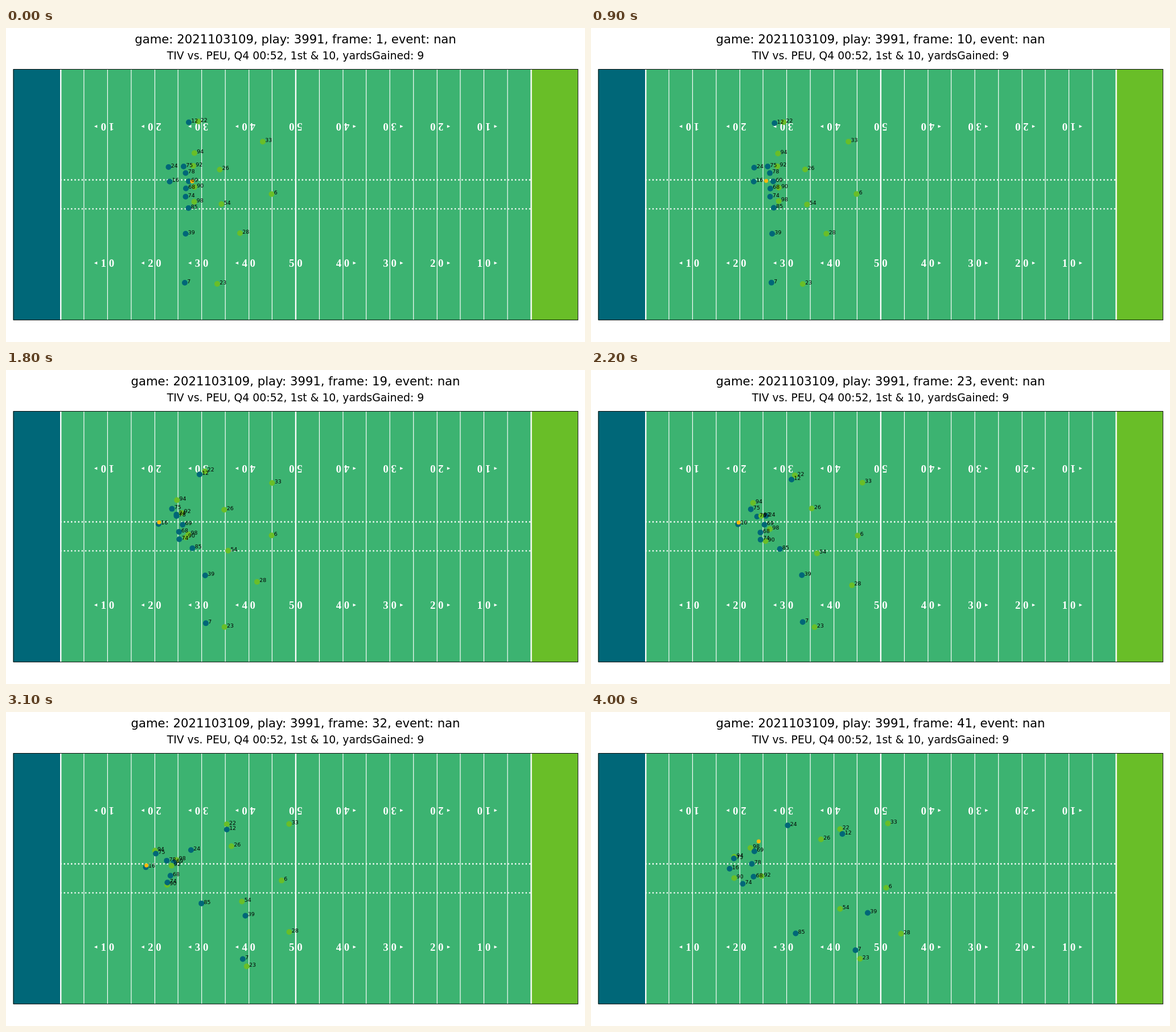
These frames come from a looping animation (1017 px wide and 551 px high, 4100 ms). An HTML page with a canvas:

```html
<!DOCTYPE html>
<html lang="en">
<head>
<meta charset="utf-8">
<title>Play tracking</title>
<style>
  html, body { margin: 0; width: 100%; height: 100%; overflow: hidden; background: #fff; }
  canvas { display: block; }
</style>
</head>
<body>
<canvas id="stage" width="1017" height="551"></canvas>
<script>
const ctx = document.getElementById('stage').getContext('2d');
const STEP = 100, STEPS = 41;
const SNAP = 6, MID = 27, THROW = 35, END = 40;
// the chart is laid out 1200 units wide at 100 dpi, then scaled to the stage
const SCALE = 1017 / 1200, PT = 100 / 72;
const LEFT = 15, YARD = 9.75, TOP = 85.5;
const TEAL = '#006778', LIME = '#69be28', GOLD = '#fbb90c', GRASS = '#3cb371';
const SANS = '"DejaVu Sans", sans-serif';
const SERIF = '"Liberation Serif", "Times New Roman", serif';
const EVENTS = { 7: 'autoevent_ballsnap', 36: 'autoevent_passforward' };

// each player: where they stand at the snap, midway and at the end
const players = [];
const away = (num, ...path) => players.push({ num, color: LIME, path });
const home = (num, ...path) => players.push({ num, color: TEAL, path });

away(94, [331, 219.5], [269, 239], [251.5, 254]);
away(90, [331, 279], [294.5, 305], [251.5, 291.5]);
away(98, [330.5, 305], [306.5, 268], [280, 238.5]);
away(22, [337.5, 164], [371.5, 192.5], [437.5, 205.5]);
away(33, [451, 199.5], [488, 197], [521.5, 195.5]);
away(26, [375.5, 248.5], [392.5, 239.5], [404, 223.5]);
away(6, [466.5, 291.5], [474, 292], [518.5, 308.5]);
away(54, [378.5, 309], [406, 327.5], [437.5, 345.5]);
away(28, [411, 360], [479.5, 383.5], [544.5, 389]);
away(23, [371, 449], [406.5, 450], [472.5, 433]);
home(12, [321, 165.5], [369.5, 201.5], [441.5, 214]);
home(24, [285.5, 244], [317, 253.5], [345.5, 199]);
home(75, [312, 243], [269.5, 246], [251, 257]);
home(78, [315.5, 254.5], [284.5, 259], [282.5, 266.5]);
const center = home(69, [321, 269], [298.5, 269.5], [287, 244.5]) - 1;
const passer = home(16, [287.5, 269.5], [249, 271.5], [243.5, 275]) - 1;
home(68, [316, 281.5], [291.5, 286.5], [285.5, 289]);
home(74, [315.5, 296], [290, 298.5], [266.5, 301.5]);
home(85, [320.5, 316], [337.5, 321], [359.5, 388.5]);
home(39, [315.5, 361], [396.5, 359], [486, 352.5]);
home(7, [314, 447], [396.5, 438.5], [464.5, 418]);
away(92, [329, 242], [291, 263], [299.5, 288]);

const mix = (a, b, u) => a + (b - a) * u;
const clamp = u => Math.min(1, Math.max(0, u));

function hermite(a, b, slopeA, slopeB, span, u) {
  const v = 1 - u;
  return a * v * v * (1 + 2 * u) + b * u * u * (3 - 2 * u)
    + span * u * v * (slopeA * v - slopeB * u);
}

// at rest until the snap, then a smooth curve through the key points
function along([a, b, c], s) {
  const cruise = (c - a) / (END - SNAP);
  if (s < MID) return hermite(a, b, 0, cruise, MID - SNAP, clamp((s - SNAP) / (MID - SNAP)));
  const span = END - MID;
  return hermite(b, c, cruise, (c - b) / span, span, (s - MID) / span);
}

const locate = (p, s) => ({
  x: along(p.path.map(q => q[0]), s),
  y: along(p.path.map(q => q[1]), s)
});

// slid under the center, snapped to the passer, carried, thrown
function ballAt(s) {
  const from = locate(players[center], s), hand = locate(players[passer], Math.min(s, THROW));
  const snap = clamp((s - SNAP) / 8), flight = clamp((s - THROW) / (END - THROW));
  const x = mix(from.x + Math.max(0, SNAP - s), hand.x + 1, snap);
  const y = mix(from.y, hand.y - 3, snap);
  return flight ? { x: mix(hand.x, 294.5, flight), y: mix(hand.y, 227, flight) } : { x, y };
}

function text(str, x, y, size, family, color, align) {
  ctx.font = `${size}px ${family}`;
  ctx.fillStyle = color;
  ctx.textAlign = align;
  ctx.fillText(str, x, y);
}

function line(x1, y1, x2, y2, width) {
  ctx.strokeStyle = '#fff';
  ctx.lineWidth = width;
  ctx.beginPath();
  ctx.moveTo(x1, y1);
  ctx.lineTo(x2, y2);
  ctx.stroke();
}

function dot({ x, y }, r, color) {
  ctx.fillStyle = color;
  ctx.beginPath();
  ctx.arc(x, y, r, 0, Math.PI * 2);
  ctx.fill();
}

function arrow(x, y, dir) {
  ctx.fillStyle = '#fff';
  ctx.beginPath();
  ctx.moveTo(x + dir * 3.3, y);
  ctx.lineTo(x - dir * 3.1, y - 3.1);
  ctx.lineTo(x - dir * 3.1, y + 3.1);
  ctx.fill();
}

function yardNumber(x, y, yards, flip) {
  ctx.save();
  ctx.translate(x, y);
  if (flip) ctx.rotate(Math.PI);
  ctx.font = `bold ${16 * PT}px ${SERIF}`;
  ctx.fillStyle = '#fff';
  ctx.textAlign = 'center';
  ctx.fillText(String(yards).split('').join(' '), 0, 7.3);
  ctx.restore();
}

function drawField(shift) {
  const at = yards => LEFT + yards * YARD;
  const snapped = x => Math.floor(x + 0.5) + 0.5;
  const bottom = 604.5 + shift, height = bottom - TOP;
  const band = (from, to, color) => {
    ctx.fillStyle = color;
    ctx.fillRect(at(from), TOP, (to - from) * YARD, height);
  };
  band(0, 120, GRASS);
  band(0, 10, TEAL);
  band(110, 120, LIME);

  for (let yd = 10; yd <= 110; yd += 5) {
    const x = snapped(at(yd));
    line(x, TOP, x, bottom, (yd % 50 === 10 ? 2 : 1) * PT);
  }

  const width = 2 * PT;
  ctx.setLineDash([width, width * 1.65]);
  for (const y of [314.5, 374.5]) line(at(10), y + shift, at(110), y + shift, width);
  ctx.setLineDash([]);

  for (let yd = 10; yd <= 90; yd += 10) {
    const x = at(yd + 10) + 0.4, side = Math.sign(yd - 50);
    for (const y of [203.9, 486.8]) {
      yardNumber(x, y, 50 - Math.abs(yd - 50), y < 300);
      if (side) arrow(x + side * 24.4, y - 0.2, side);
    }
  }
  ctx.strokeStyle = '#000';
  ctx.lineWidth = 0.8 * PT;
  ctx.strokeRect(snapped(at(0)), TOP, 120 * YARD, height);
}

function drawPlayers(s) {
  const spots = players.map(p => ({ ...p, ...locate(p, s) }));
  for (const p of spots) dot(p, 5, p.color);
  dot(ballAt(s), 3.5, GOLD);
  for (const p of spots) text(p.num, p.x + 4.3, p.y + 0.7, 8 * PT * SCALE, SANS, '#000', 'left');
}

function draw(s) {
  const count = s + 1, event = EVENTS[count];
  ctx.fillStyle = '#fff';
  ctx.fillRect(0, 0, 1017, 551);
  ctx.save();
  ctx.scale(SCALE, SCALE);
  text(`game: 2021103109, play: 3991, frame: ${count}, event: ${event || 'nan'}`,
    600, 32, 18 * PT, SANS, '#000', 'center');
  text('TIV vs. PEU, Q4 00:52, 1st & 10, yardsGained: 9',
    600, 65, 16 * PT, SANS, '#000', 'center');
  drawField(event ? 1 : 0);
  ctx.restore();
  drawPlayers(s);
}

const start = performance.now();
function tick() {
  draw(Math.floor((performance.now() - start) / STEP) % STEPS);
  requestAnimationFrame(tick);
}
tick();
</script>
</body>
</html>
```
